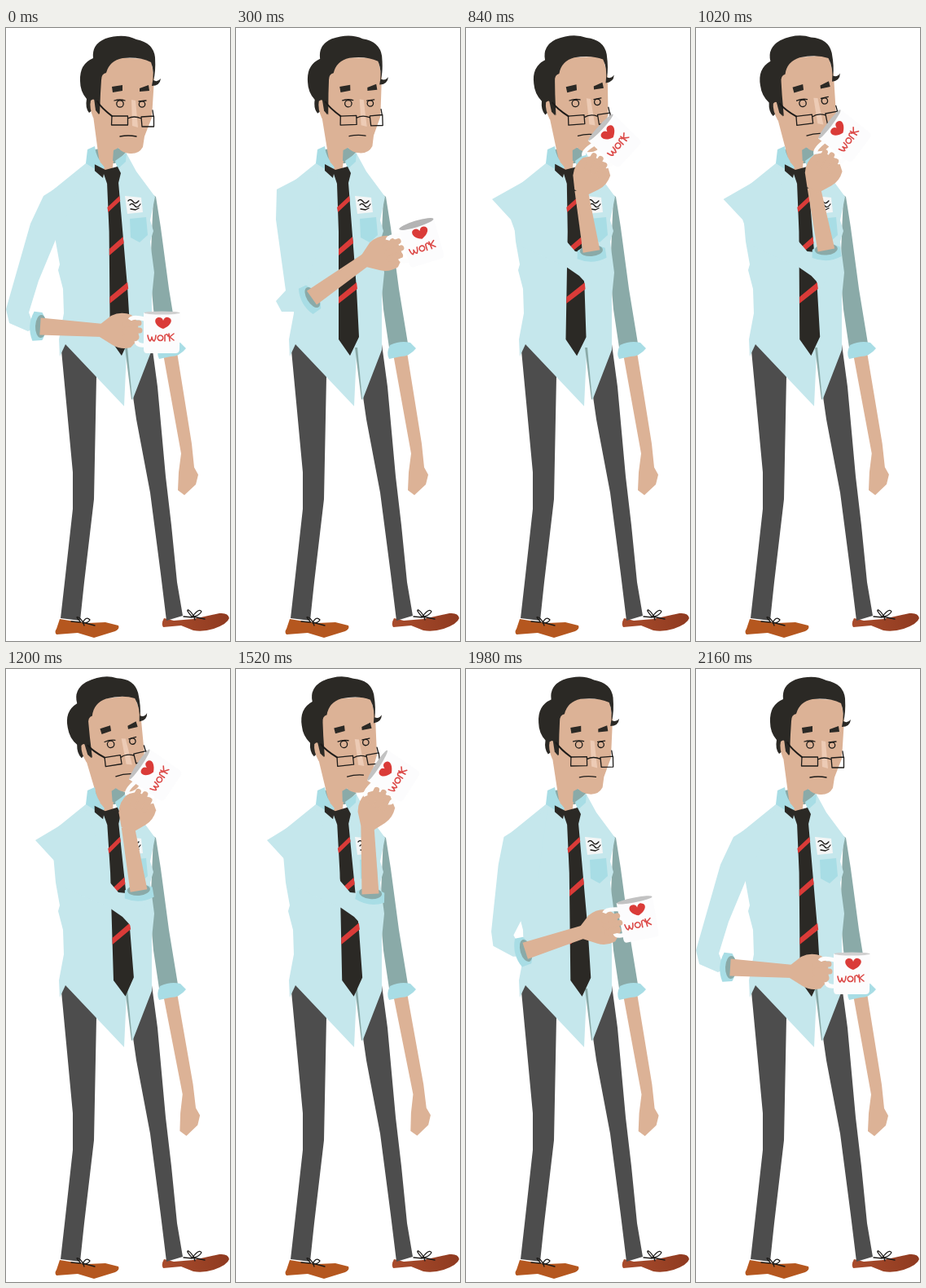
Animation, 275 px wide and 752 px high, one loop 2.3 s. Source, as an HTML page:

```html
<!DOCTYPE html>
<html lang="en">
<head>
<meta charset="utf-8">
<title>Coffee break</title>
<style>
html, body { margin: 0; width: 100%; height: 100%; overflow: hidden; background: #fff; }
svg { display: block; width: 100%; height: 100%; }
.skin { fill: #dcb296; }
.shirt { fill: #c5e7ec; }
.shade { fill: #8aaaa8; }
.trim { fill: #a8dde5; }
.dark { fill: #2b2925; }
.red { fill: #da3b38; }
.trousers { fill: #4d4d4d; }
.line { fill: none; stroke: #1d1b19; stroke-width: 1.3; stroke-linecap: round; stroke-linejoin: round; }
.pen { fill: none; stroke: #dc4a48; stroke-width: 1.6; stroke-linecap: round; stroke-linejoin: round; }
</style>
</head>
<body>
<svg viewBox="0 0 275 752">
  <defs>
    <linearGradient id="leather"><stop stop-color="#a94c2c"/><stop offset="1" stop-color="#8f3a20"/></linearGradient>
  </defs>

  <!-- legs and shoes -->
  <path fill="#b5571f" d="M66 725L78 727L100 730L122 729L138 733Q140 737 134 740L108 748L88 742L62 744Q59 741 62 737Z"/>
  <path fill="url(#leather)" d="M194 724L206 727L230 725L262 718Q273 717 274 724Q272 731 255 737Q242 741 230 739L215 733L193 735Q190 731 194 724Z"/>
  <path class="trousers" d="M67 385L75 470L82 545L82 590L72 680L67 724L91 727L96 680L108 578L111 428L108 395Z"/>
  <path class="trousers" d="M147 390L160 480L177 570L190 670L197 727L217 721L210 680L203 610L196 550L186 440L179 388Z"/>
  <path class="line" d="M80 728L92 729Q84 721 89 723Q94 726 96 733M94 730Q98 721 103 726Q100 731 94 729L109 733M218 722L229 723Q220 713 224 714Q229 717 232 726M229 722Q237 711 240 716Q236 722 229 722L244 725"/>

  <!-- far arm -->
  <g id="farArm">
    <path class="skin" d="M193 400L210 398L228 510L231 539L236 548L233 560L219 573L211 567L212 545L215 522Z"/>
  </g>
  <path class="shade" d="M181 205L184 207L190 245L200 320L211 387L188 392L181 345L177 300Z"/>
  <path class="trim" d="M189 389Q202 383 214 386L221 393Q213 403 202 403L188 406Q184 399 189 389Z"/>

  <path class="shade" d="M103 150L133 145L148 152L134 166L116 166Z"/>
  <g id="head">
    <path class="skin" d="M106 100L112 145L116 174L130 176L132 150L138 147Q142 153 152 154Q163 155 168 146L170 133L179 110L182 62L178 38L128 36L113 60Z"/>
    <path class="dark" d="M102 104Q97 98 99 87Q91 78 91 65Q90 44 107 37Q105 20 122 13Q144 6 160 14Q181 18 183 36Q184 54 181 64Q186 67 190 62Q189 71 179 71Q183 54 178 42Q164 35 143 37Q127 40 123 55Q117 56 117 64L116 80L115 106L110 98Z"/>
    <path class="skin" d="M104 89Q109 84 113 95L114 112L107 110Q102 98 104 89Z"/>
    <path class="dark" d="M108 86L115 87L114 106L110 101Z"/>
    <path class="dark" d="M130 72L143 70L143 77L131 79ZM164 74L175 70L176 77L164 78Z"/>
    <path fill="#edcbb5" d="M154 88L159 89L162 122L155 120Z"/>
    <g class="line">
      <circle cx="140" cy="93" r="4.2"/><circle cx="167" cy="93.5" r="3.7"/>
      <path d="M133 89Q140 87 146 89M163 90L172 89M140 133Q150 131 160 133"/>
      <path d="M130 108H149.500V119H129.500ZM166 109L181.500 108V121H167ZM149.500 111Q157 107 166 111M181 108L180 101"/>
      <path stroke-width="2" d="M112 90Q117 98 130 108"/>
    </g>
  </g>

  <!-- shirt -->
  <path class="shirt" d="M98 166L112 164L130 185L148 154L160 176L183 207L177 236L181 249L177 262L182 300L179 330L179 395L155 457L148 398L145 464L73 388L66 403L65 382L71 350L70 320L64 297L66 290L61 262L58 228L56 200Z"/>
  <path class="shade" d="M146 392L149 392L155 455L154 456Z"/>
  <path class="trim" d="M100 149L109 145Q110 158 121 171L117 178L98 166ZM134 163L148 153L147 164L137 173Z"/>
  <path class="skin" d="M115 164L132 163L130 178Z"/>
  <path class="trim" d="M152 234L172 232L174 254L164 263L153 257Z"/>
  <path fill="#f4f6f6" d="M146 206L166 208L168 226L149 228Z"/>
  <path class="line" d="M150 212Q153 209 156 213T163 212M152 217Q155 214 158 218T165 216M153 222L159 223L163 221"/>
  <g id="tie">
    <path class="dark" d="M109 167L122 174L137 170L141 178L138 190L148 320L151 379L140 402L126 382L126 250L124 191L120 179L119 184L109 175Z"/>
    <path class="red" d="M124 220L139 206L140 212L125 226ZM126 271L143 256L144 264L126 279ZM126 330L148 312L149 320L126 338Z"/>
  </g>

  <!-- near arm -->
  <path id="sleeve" class="shirt"/>
  <g id="cuff">
    <path class="trim" d="M2 -17L-8 -18Q-17 0 -9 18L3 17Q12 0 2 -17Z"/>
    <ellipse class="shade" cx="1" rx="7" ry="14"/>
  </g>
  <path id="forearm" class="skin"/>
  <g id="hand">
    <path class="skin" d="M-26 -7L-12 -18Q0 -24 13 -19L21 -10L22 10L12 21Q0 24 -10 18L-26 8Z"/>
  </g>
  <g id="mug">
    <path fill="none" stroke="#fdfdfd" stroke-width="5" d="M-21 -17Q-36 -21 -39 -16M-21 15Q-30 16 -31 10"/>
    <path fill="#fcfcfd" d="M-22 -25H23L22 20Q22 25 17 25H-18Q-22 25 -22 20Z"/>
    <ellipse id="rim" cx=".5" cy="-24.500" rx="22"/>
    <path class="red" d="M2 -5C-10 -9 -10 -19 -3 -19Q1 -19 2 -15Q4 -20 8 -19C15 -17 12 -9 2 -5Z"/>
    <path class="pen" d="M-17 3Q-16 9 -14 10Q-12 8 -12 5Q-11 10 -9 10Q-7 7 -7 3M-2 3A3.300 3.300 0 1 0 -1 3M4 10L4 3Q7 0 8 4M9 1L10 10M15 1L10 5L15 9"/>
  </g>
  <g id="fingers" fill="none" stroke="#dcb296" stroke-width="7" stroke-linecap="round">
    <path d="M5 -8L22 -9M5 0L23 0M5 8L19 8"/>
  </g>
</svg>
<script>
const LOOP = 2300, REST = 2160, STEP = 20;

// Outline of the near sleeve: shoulder, elbow, cuff, armpit.
const sleeves = {
  low:  [46,206, 30,240, 0,345, 4,362, 27,372, 35,368, 28,349, 40,310, 60,262],
  bent: [50,198, 49,235, 61,322, 49,335, 56,348, 90,348, 86,314, 95,290, 105,262],
  high: [32,210, 55,235, 67,268, 123,293, 139,304, 152,318, 173,278, 134,274, 122,260],
  near: [47,206, 53,240, 66,290, 80,310, 104,325, 125,331, 110,296, 118,280, 120,262]
};

const pose = (time, sleeve, shift, cuff, hand, mug, tilts) => ({
  time,
  values: [...cuff, ...hand, ...mug, ...tilts, ...sleeves[sleeve].map((v, i) => i % 2 ? v : v + shift)]
});

// cuff, hand and mug: x, y, angle; tilts: head, tie, far arm, rim height
const poses = [
  pose(0,    'low',  0, [42,366,2],     [141,371,0],   [191,374,0],   [0,-.5,0,2]),
  pose(300,  'bent', 0, [93,331,-31],   [181,277,-18], [228,264,-17], [-1.7,0,0,4]),
  pose(840,  'high', 0, [154,274,-94],  [153,180,-58], [183,139,-47], [-4.5,1,0,3]),
  pose(1200, 'high', 4, [163,272,-95],  [160,174,-62], [184,131,-56], [-9,-1.7,-.8,3]),
  pose(1520, 'high', 6, [165,276,-84],  [171,172,-64], [194,132,-57], [-6,-1.2,-1.1,3]),
  pose(1800, 'near', 0, [120,313,-46],  [192,237,-37], [231,210,-30], [-3,-.9,-.6,4]),
  pose(REST, 'low',  0, [42,366,2],     [141,371,0],   [191,374,0],   [0,-.5,0,2])
];

const $ = id => document.getElementById(id);
const place = (id, x, y, angle) => $(id).setAttribute('transform', `translate(${x} ${y}) rotate(${angle})`);
const turn = (id, angle, x, y) => $(id).setAttribute('transform', `rotate(${angle} ${x} ${y})`);
const polygon = (id, points) => $(id).setAttribute('d', 'M' + points.map(v => v.toFixed(2)).join(' ') + 'Z');

const slope = (k, i) =>
  (poses[k + 1].values[i] - poses[k].values[i]) / (poses[k + 1].time - poses[k].time);

// Smooth tangent that never overshoots a pose.
function tangent(k, i) {
  if (k === 0 || k === poses.length - 1) return 0;
  const a = slope(k - 1, i), b = slope(k, i);
  return a * b > 0 ? 2 * a * b / (a + b) : 0;
}

function valuesAt(time) {
  let k = 0;
  while (k < poses.length - 2 && time >= poses[k + 1].time) k++;
  const from = poses[k], to = poses[k + 1], span = to.time - from.time;
  const u = (time - from.time) / span, ease = u * u * (3 - 2 * u);
  return from.values.map((v, i) =>
    v + (to.values[i] - v) * ease +
    span * u * (1 - u) * ((1 - u) * tangent(k, i) - u * tangent(k + 1, i)));
}

function drawForearm(cx, cy, hx, hy, angle) {
  const a = angle * Math.PI / 180;
  const wx = hx - 22 * Math.cos(a), wy = hy - 22 * Math.sin(a);
  const length = Math.hypot(wx - cx, wy - cy);
  const nx = (cy - wy) / length, ny = (wx - cx) / length;
  polygon('forearm', [
    cx + nx * 10.5, cy + ny * 10.5, wx + nx * 8, wy + ny * 8,
    wx - nx * 8, wy - ny * 8, cx - nx * 10.5, cy - ny * 10.5
  ]);
}

function draw(time) {
  const [cx, cy, ca, hx, hy, ha, mx, my, ma, head, tie, farArm, rim, ...sleeve] = valuesAt(time);
  turn('head', head, 130, 165);
  turn('tie', tie, 130, 180);
  turn('farArm', farArm, 200, 395);
  polygon('sleeve', [100, 172, ...sleeve]);
  place('cuff', cx, cy, ca);
  drawForearm(cx, cy, hx, hy, ha);
  place('hand', hx, hy, ha);
  place('fingers', hx, hy, ha);
  place('mug', mx, my, ma);
  $('rim').setAttribute('ry', rim);
  const grey = Math.round(236 - rim * 14);
  $('rim').setAttribute('fill', `rgb(${grey},${grey},${grey})`);
}

const start = performance.now();
function tick() {
  const elapsed = (performance.now() - start) % LOOP;
  draw(Math.min(REST, Math.floor(elapsed / STEP) * STEP));
  requestAnimationFrame(tick);
}
tick();
</script>
</body>
</html>
```
